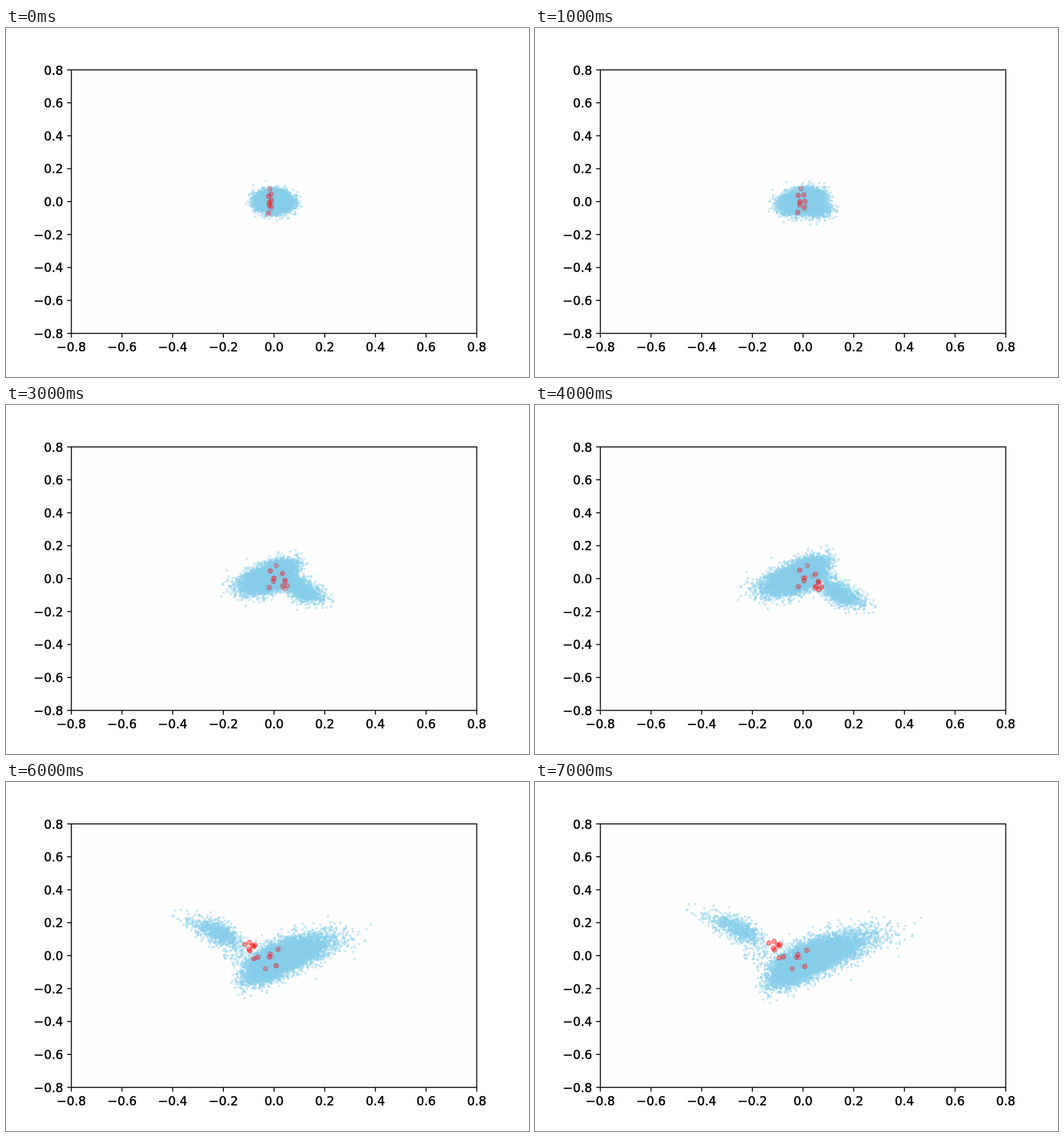
Animation, 917 px wide and 611 px high, one loop 8 s. Source, as an HTML page with a canvas:

```html
<!DOCTYPE html>
<html lang="en">
<head>
<meta charset="utf-8">
<title>Scatter</title>
<style>
  html, body { margin: 0; width: 100%; height: 100%; overflow: hidden; background: #fff; }
  canvas, svg { position: absolute; left: 0; top: 0; width: 917px; height: 611px; }
  text { font: 21.2px "DejaVu Sans", sans-serif; stroke: #000; stroke-width: .55px; }
  path { fill: none; stroke: #000; stroke-width: 1.7px; }
</style>
</head>
<body>
<canvas id="plot" width="917" height="611"></canvas>
<svg id="axes" viewBox="0 0 917 611"></svg>
<script>
const LEFT = 114.6, RIGHT = 825.4, TOP = 73.3, BOTTOM = 534.6;
const CX = 470, CY = 304, COUNT = 10000, STRAYS = 60, STEP = 1000, STEPS = 8;
const ctx = document.getElementById('plot').getContext('2d');

// Red markers at the last step: x, y and how clearly they show inside the cloud.
const markers = [
  [-60, -22, .2], [-51, -25, .2], [-45, -19, .3], [-42, -17, .3],
  [-40, -20, .2], [-50, -10, .7], [-52, -13, .2], [-42, 4, .8],
  [-34, 2, .1], [-11, 3, .9], [-9, -2, .8], [-6, 3, .3],
  [3, 19, .9], [-19, 23, .6], [6, -9, .7], [10, -10, .2]
];

const lerp = (a, b, t) => a + (b - a) * t;
const clamp = v => Math.min(1, Math.max(0, v));

function randomizer(seed) {
  return () => {
    seed = seed + 0x6D2B79F5 | 0;
    let t = Math.imul(seed ^ seed >>> 15, 1 | seed);
    t = t + Math.imul(t ^ t >>> 7, 61 | t) ^ t;
    return ((t ^ t >>> 14) >>> 0) / 4294967296;
  };
}
const rand = randomizer(42);
const points = Array.from({ length: COUNT + STRAYS }, () => {
  const r = Math.sqrt(-2 * Math.log(1 - rand())), a = rand() * 2 * Math.PI;
  return [r * Math.cos(a), r * Math.sin(a)];
});

// Both clouds start as one and grow, tilt, skew and bend with each step.
function mainCloud(n) {
  return {
    x: 2.4 * n, y: .8 * n,
    length: 13.5 * 1.18 ** n, width: 8.2 * 1.075 ** n,
    angle: -.42 * (1 - Math.exp(-n)), skew: .012 * n, bend: .22 * n
  };
}

function sideCloud(n) {
  return {
    x: -16.5 * n, y: -6.6 * n,
    length: 13.5 * 1.1 ** n, width: 8.2 * 1.02 ** n,
    angle: .45 * (1 - Math.exp(-n)), skew: -.014 * n, bend: .15 * n
  };
}

function place([u, v], c) {
  const q = u * u - 1;
  const along = c.length * (u + c.skew * q), across = c.width * v + c.bend * q;
  const cos = Math.cos(c.angle), sin = Math.sin(c.angle);
  return [c.x + along * cos - across * sin, c.y + along * sin + across * cos];
}

function disc(x, y, r) {
  ctx.beginPath();
  ctx.arc(x, y, r, 0, 2 * Math.PI);
  ctx.fill();
}

function draw(n) {
  const sign = n < 5 ? -1 : 1; // the projection turns over halfway
  const main = mainCloud(n), side = sideCloud(n);
  const sideCount = COUNT * .2 * .87 ** n;

  ctx.globalAlpha = 1;
  ctx.fillStyle = '#fefefe';
  ctx.fillRect(LEFT, TOP, RIGHT - LEFT, BOTTOM - TOP);

  ctx.fillStyle = 'rgba(135, 206, 235, .45)';
  points.forEach((p, i) => {
    const [x, y] = i >= COUNT
      ? [n * (2.2 * p[0] - 11), 1.7 * n * p[1]]
      : place(p, i < sideCount ? side : main);
    disc(CX + sign * x, CY + sign * y, 2.2);
  });

  ctx.fillStyle = ctx.strokeStyle = 'rgba(255, 0, 0, .4)';
  ctx.lineWidth = 1.5;
  for (const [x7, y7, clear] of markers) {
    const x = x7 + (n - 7) * (.13 * x7 - 1.3);
    const y = y7 + (n - 7) * (.06 * x7 + 1.2);
    ctx.globalAlpha = lerp(clear, 1, clamp((-x - 12) / 18));
    disc(CX + sign * x, CY + sign * y, 3.9);
    ctx.stroke();
  }
}

function drawAxes() {
  let path = `M${LEFT} ${TOP}H${RIGHT}V${BOTTOM}H${LEFT}Z`, labels = '';
  const label = (x, y, anchor, s) =>
    labels += `<text x="${x}" y="${y}" text-anchor="${anchor}">${s}</text>`;
  for (let i = 0; i <= 8; i++) {
    const x = lerp(LEFT, RIGHT, i / 8), y = lerp(BOTTOM, TOP, i / 8);
    const s = (i < 4 ? '\u2212' : '') + (Math.abs(i - 4) / 5).toFixed(1);
    path += `M${x} ${BOTTOM}v7.4M${LEFT} ${y}h-7.4`;
    label(x, 565.5, 'middle', s);
    label(100.2, y + 8.2, 'end', s);
  }
  document.getElementById('axes').innerHTML = `<path d="${path}"/>${labels}`;
}

let shown = -1;
function tick() {
  const n = Math.floor(performance.now() / STEP) % STEPS;
  if (n !== shown) draw(shown = n);
  requestAnimationFrame(tick);
}
drawAxes();
tick();
</script>
</body>
</html>
```
